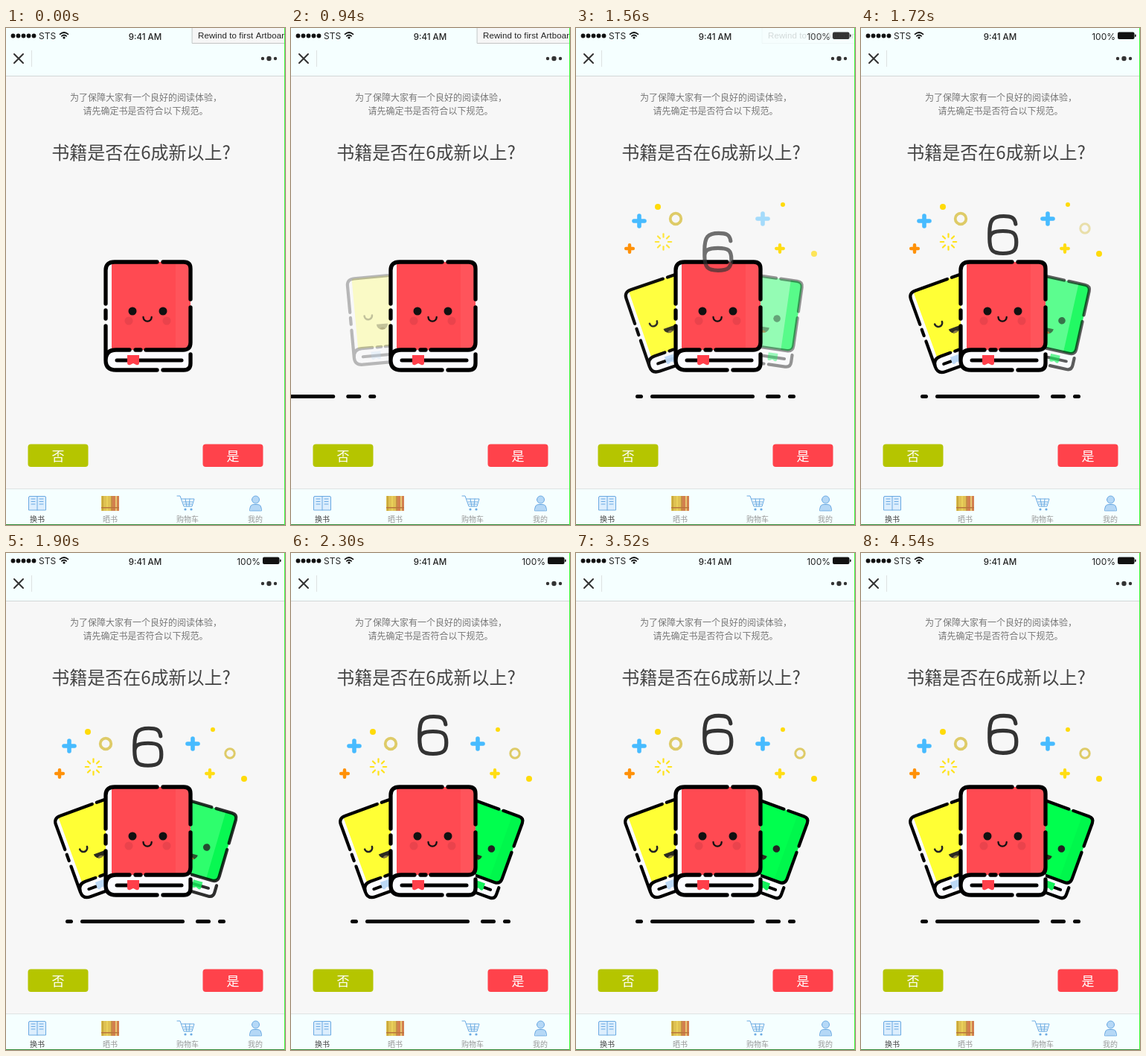
Recreate the animation shown at these times as an HTML page with a canvas. Size 375 by 667 pixels, loop 4.56 s.

```html
<!DOCTYPE html>
<html lang="zh-CN">
<head>
<meta charset="utf-8">
<style>
html, body { margin: 0; width: 100%; height: 100%; overflow: hidden; background: #f7f7f7; }
canvas { display: block; width: 375px; height: 667px; }
</style>
</head>
<body>
<canvas id="stage"></canvas>
<script>
const LOOP = 4560;
const canvas = document.getElementById('stage');
const ctx = canvas.getContext('2d');
const dpr = window.devicePixelRatio || 1;
canvas.width = 375 * dpr;
canvas.height = 667 * dpr;

const CJK = '"Noto Sans CJK SC", "Noto Sans CJK", sans-serif';
const LATIN = 'Inter, sans-serif';
const INK = '#000';

const progress = (t, start, length) => Math.min(1, Math.max(0, (t - start) / length));
const easeOut = (u, power = 2) => 1 - (1 - u) ** power;

function rect(x, y, w, h, color, r = 0) {
  ctx.fillStyle = color;
  ctx.beginPath();
  ctx.roundRect(x, y, w, h, r);
  ctx.fill();
}

function disc(x, y, r, color) {
  ctx.fillStyle = color;
  ctx.beginPath();
  ctx.arc(x, y, r, 0, Math.PI * 2);
  ctx.fill();
}

function stroke(d, color, width) {
  ctx.strokeStyle = color;
  ctx.lineWidth = width;
  ctx.lineCap = ctx.lineJoin = 'round';
  ctx.stroke(new Path2D(d));
}

function text(str, x, y, font, color, align = 'center') {
  ctx.font = font;
  ctx.fillStyle = color;
  ctx.textAlign = align;
  ctx.fillText(str, x, y);
}

function layer(alpha, draw) {
  if (alpha <= 0) return;
  ctx.save();
  ctx.globalAlpha = alpha;
  draw();
  ctx.restore();
}

function statusBar() {
  rect(0, 0, 375, 64, '#f5ffff');
  rect(0, 64, 375, 1, '#d3d7d7');
  for (let i = 0; i < 5; i++) disc(9.5 + i * 7, 10.5, 2.9, '#111');
  text('STS', 44, 15, '12px ' + LATIN, '#222', 'left');
  stroke('M72.5 8.3Q78 3.7 83.5 8.3M74.8 10.8Q78 8.2 81.2 10.8', '#111', 1.7);
  disc(78, 13, 1.6, '#111');
  text('9:41 AM', 187, 15.5, '500 11.5px ' + LATIN, '#222');
  text('100%', 342, 15.5, '12px ' + LATIN, '#222', 'right');
  rect(345, 5.5, 22.5, 9.5, '#111', 2);
  rect(368, 8.5, 1.6, 3.5, '#111', 1);
}

function navBar() {
  stroke('M11 35L23 47M23 35L11 47', '#333', 2);
  rect(34, 30, 1, 22, '#dde2e2');
  disc(345, 41, 2.2, '#333');
  disc(353.5, 41, 3.2, '#333');
  disc(362, 41, 2.2, '#333');
}

function button(x, color, label) {
  rect(x - 0.5, 558.5, 81, 30.5, color, 4);
  text(label, x + 40, 580.5, '17px ' + CJK, '#fff');
}

function tabBar() {
  rect(0, 618, 375, 49, '#f5ffff');
  rect(0, 618, 375, 1, '#dfe4e4');
  const blue = '#6aa9e2', pale = '#b5d8f6';

  rect(30.5, 628.5, 23, 18.5, '#dceefd', 2);
  stroke('M32 628.5H52Q53.5 628.5 53.5 630V647H30.5V630Q30.5 628.5 32 628.5M42 629V647', blue, 1);
  stroke('M34 632H39M34 635.5H39M34 639H39M45 632H50M45 635.5H50M45 639H50', blue, 1);

  rect(128, 628, 13, 20, '#dfc153');
  rect(141, 628, 11, 20, '#d3804f');
  ['#c9a83b', '#ead15a', '#c78f45', '#e8c873'].forEach((color, i) => rect(129 + i * 6, 628, 2, 20, color));
  rect(128, 643, 24, 1.5, '#b9743c');

  stroke('M230 628H234L239 642H250L253 632H236M238 636H251M239 639H250M241 632L243 642M247 632L246 642', blue, 1);
  disc(241, 646, 1.6, blue);
  disc(249, 646, 1.6, blue);

  disc(335.5, 633, 5, pale);
  stroke('M330.5 633A5 5 0 1 1 340.5 633A5 5 0 1 1 330.5 633', blue, 1);
  rect(328, 640, 15, 7.5, pale, 3);
  stroke('M327.5 647.5Q327.5 639.5 333 639.5H338Q343.5 639.5 343.5 647.5Z', blue, 1);

  [['换书', 42, '#444'], ['晒书', 140, '#999'], ['购物车', 244, '#999'], ['我的', 335, '#999']]
    .forEach(([label, x, color]) => text(label, x, 662.5, '10px ' + CJK, color));
}

// Local space: left and top outlines run along x = 0 and y = 0.
function book({ cover, edge, ribbon, ribbonX, face }) {
  rect(0, 0, 114, 145, '#fbfcff', 11);
  rect(8, 0, 106, 118, cover, [4, 9, 9, 0]);
  rect(94, 0, 20, 118, edge, [0, 9, 9, 0]);
  stroke('M0 56V11Q0 0 12 0H69M77 0H105Q114 0 114 9V50M114 61V108Q114 118 104 118H54' +
    'M47 118H40M32 118H14Q0 118 0 132M0 65V76M0 86V132Q0 145 14 145H69M77 145H105Q114 145 114 136V124',
    INK, 5.3);
  stroke('M15 132H102', INK, 5);
  ctx.fillStyle = ribbon;
  ctx.fill(new Path2D(`M${ribbonX} 125h16v10q0 4-4 3l-4-2l-4 2q-4 1-4-3Z`));
  face();
}

function openMouth(x, y, tongue) {
  ctx.save();
  ctx.translate(x, y);
  ctx.beginPath();
  ctx.arc(0, -4, 9.5, 0, Math.PI);
  ctx.closePath();
  ctx.fillStyle = '#2b2a20';
  ctx.fill();
  ctx.clip();
  disc(0, 7, 5.5, tongue);
  ctx.restore();
}

function redFace() {
  disc(31, 79, 5.5, '#ea434c');
  disc(82, 79, 5.5, '#ea434c');
  disc(36, 66, 5.5, '#111');
  disc(77, 66, 5.5, '#111');
  stroke('M50.5 74A5.6 5.6 0 0 0 61.7 74', '#111', 2.3);
}

function yellowFace() {
  stroke('M23.5 64A6.5 6.5 0 0 0 36.5 64', '#222', 3.2);
  openMouth(52, 84, '#8a7a45');
}

function greenFace() {
  disc(80, 67, 6, '#222');
  openMouth(60, 88, '#f08a3c');
}

const redBook = { cover: '#ff4a52', edge: '#ff545b', ribbon: '#ff3f4a', ribbonX: 29, face: redFace };
const yellowBook = { cover: '#ffff35', edge: '#ffff4a', ribbon: '#bcd9f6', ribbonX: 29, face: yellowFace };
const greenBook = { cover: '#00ff4e', edge: '#00f74c', ribbon: '#12f25a', ribbonX: 74, face: greenFace };

// Side books fan out from behind the front book: side is -1 (left) or 1 (right).
function sideBook(p, side, style) {
  layer(p, () => {
    ctx.translate(188.5 + side * (49.2 - 7 * (1 - p)), 370);
    ctx.rotate(side * p * 20 * Math.PI / 180);
    ctx.translate(side < 0 ? -66 : -25, -39);
    ctx.scale(0.8, 0.8);
    book(style);
  });
}

const plus = (x, y, arm, width, color) => () =>
  stroke(`M${x - arm} ${y}h${2 * arm}M${x} ${y - arm}v${2 * arm}`, color, width);
const dot = (x, y, r) => () => disc(x, y, r, '#ffdb0a');
const ring = (x, y, r, width) => () =>
  stroke(`M${x - r} ${y}a${r} ${r} 0 1 1 ${2 * r} 0a${r} ${r} 0 1 1 ${-2 * r} 0`, '#decb68', width);

function burst() {
  for (let i = 0; i < 8; i++) {
    const a = i * Math.PI / 4, c = Math.cos(a), s = Math.sin(a);
    stroke(`M${117.5 + 6.3 * c} ${287 + 6.3 * s}L${117.5 + 10.7 * c} ${287 + 10.7 * s}`, '#ffe21a', 2.2);
  }
}

// [fade start, fade length, shape]
const sparks = [
  [950, 300, dot(110, 240, 4)],
  [1070, 300, ring(134, 256, 7.3, 3.8)],
  [1130, 300, plus(85, 259, 7, 5.6, '#47bbff')],
  [1190, 300, dot(278, 237, 3)],
  [1260, 260, plus(72, 296, 4.8, 4.5, '#ff9108')],
  [1300, 260, plus(274, 296, 4.8, 4.3, '#ffdd14')],
  [1320, 280, burst],
  [1360, 300, dot(320, 303, 4)],
  [1420, 300, plus(251, 256, 7, 5.6, '#47bbff')],
  [1560, 300, ring(301, 269, 6.2, 3)]
];

function ground(t) {
  if (t < 800) return;
  ctx.save();
  ctx.translate(-300 * (1 - easeOut(progress(t, 800, 630))), 494.5);
  stroke('M82.5 0H87.5M102.5 0H237.5M257.5 0H272.5M287.5 0H292.5', INK, 5);
  ctx.restore();
}

function numeral(t) {
  layer(easeOut(progress(t, 1384, 400)), () => {
    ctx.translate(190.8, 243.3 + 92 * (1 - easeOut(progress(t, 1384, 1200), 3)));
    stroke('M17-14.5C16-23 11-25 1-25C-14-25-18-20-18-2V5C-18 21-14 25 0 25' +
      'C14 25 18 21 18 10C18-2 14-5 0-5C-13-5-18-2-18 6', '#333', 5.2);
  });
}

function tooltip(t) {
  layer(1 - progress(t, 1250, 370), () => {
    rect(251, -2, 130, 22, '#f6f6f6', 2);
    ctx.strokeStyle = '#c4c4c4';
    ctx.lineWidth = 1;
    ctx.strokeRect(250.5, -2.5, 130, 23);
    ctx.letterSpacing = '0.1px';
    text('Rewind to first Artboard', 258, 14, '11.5px "Liberation Sans", sans-serif', '#222', 'left');
  });
}

function draw(t) {
  ctx.setTransform(dpr, 0, 0, dpr, 0, 0);
  rect(0, 0, 375, 667, '#f7f7f7');
  statusBar();
  navBar();
  text('为了保障大家有一个良好的阅读体验，', 188, 97.5, '12px ' + CJK, '#777');
  text('请先确定书是否符合以下规范。', 187.5, 115.5, '12px ' + CJK, '#777');
  text('书籍是否在6成新以上?', 181.5, 176, '24px ' + CJK, '#444');

  sparks.forEach(([start, length, shape]) => layer(progress(t, start, length), shape));
  ground(t);
  sideBook(easeOut(progress(t, 800, 1000)), -1, yellowBook);
  sideBook(easeOut(progress(t, 1330, 1000)), 1, greenBook);
  ctx.save();
  ctx.translate(134, 314);
  book(redBook);
  ctx.restore();
  numeral(t);

  button(30, '#b5c500', '否');
  button(265, '#ff424b', '是');
  tabBar();
  tooltip(t);
  rect(0, 666, 375, 1, '#2f8a35');
  rect(374, 0, 1, 667, '#3dfb3d');
}

const origin = performance.now();
function tick() {
  draw((performance.now() - origin) % LOOP);
  requestAnimationFrame(tick);
}
tick();
</script>
</body>
</html>
```
